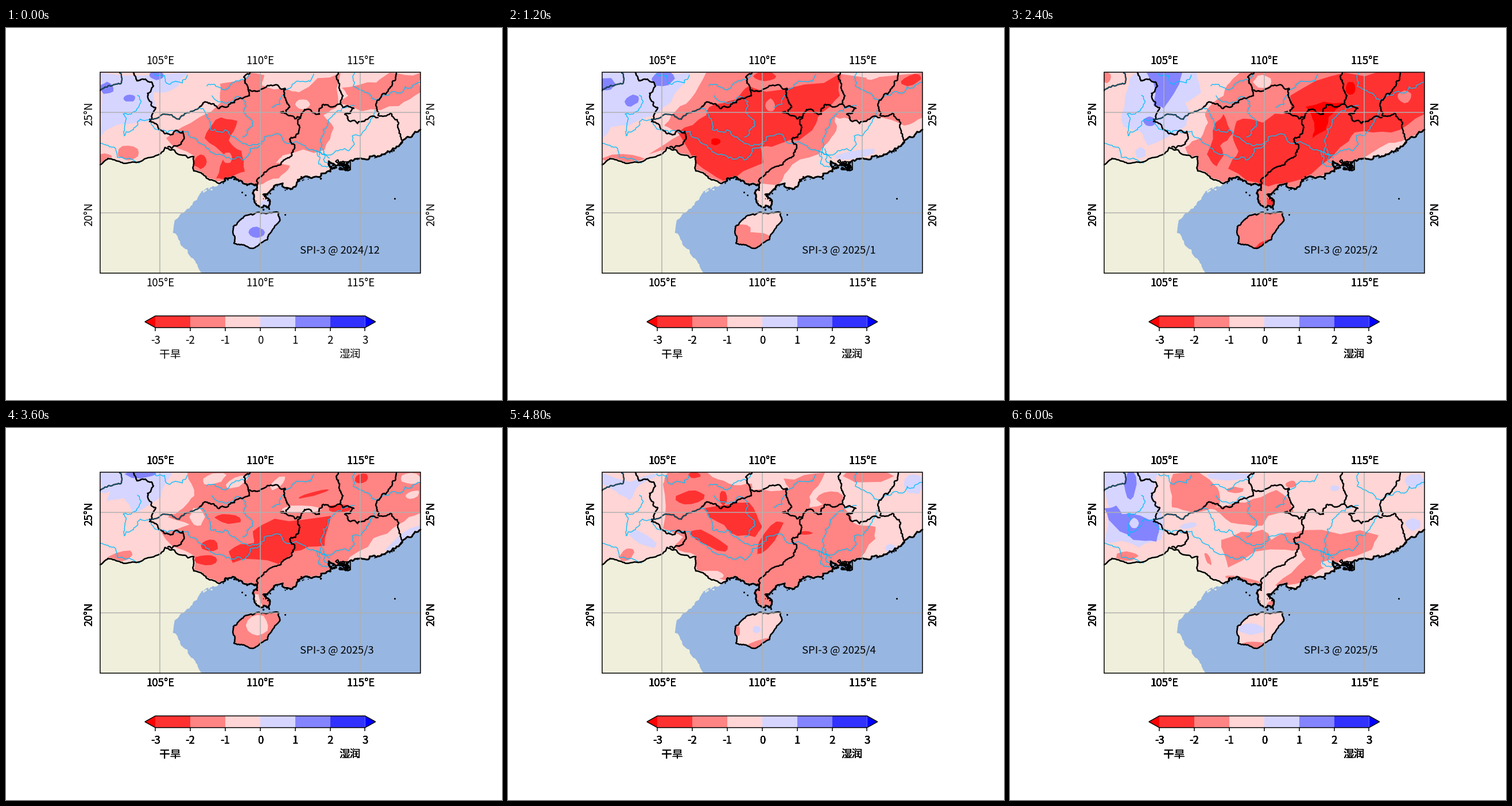
Recreate the animation shown at these times as a matplotlib script. Size 864 px wide and 648 px high, loop 7.2 s.

```python
import numpy as np
import matplotlib.pyplot as plt
from matplotlib.animation import FuncAnimation
from matplotlib.patches import Polygon
from matplotlib.path import Path

W, H, DPI = 864, 648, 135
COUNT, STEP = 6, 1200
COLORS = ["#ff0000", "#ff3232", "#ff8484", "#ffd5d5",
          "#d5d5ff", "#8484ff", "#3232ff", "#0000ff"]
OCEAN, LAND, RIVER, GRID = "#97b6e1", "#efefdb", "#00bfff", "#b0b0b0"
LEFT, RIGHT, TOP, BOTTOM = 163.5, 722.1, 77.3, 427.0
DEG = (RIGHT - LEFT) / 16

plt.rcParams["font.family"] = "Noto Sans CJK JP"
plt.rcParams["font.size"] = 10
rng = np.random.default_rng(7)

fig = plt.figure(figsize=(W / DPI, H / DPI), dpi=DPI, facecolor="white")
ax = fig.add_axes([0, 0, 1, 1])
ax.set_xlim(0, W)
ax.set_ylim(H, 0)
ax.axis("off")
fields = [[] for _ in range(COUNT)]
labels = [[] for _ in range(COUNT)]


def pts(*v):
    return np.reshape(np.array(v, float), (-1, 2))


def rough(p, amp=0.14, rounds=4):
    """Fractal line: halve every segment and push its middle sideways."""
    for _ in range(rounds):
        d = np.diff(p, axis=0)
        side = d[:, ::-1] * [1, -1] * rng.normal(0, amp, (len(d), 1))
        out = np.empty((2 * len(p) - 1, 2))
        out[::2] = p
        out[1::2] = (p[:-1] + p[1:]) / 2 + side
        p = out
    return p


def line(p, color, lw, z):
    ax.plot(p[:, 0], p[:, 1], color=color, lw=lw, zorder=z,
            solid_joinstyle="round", solid_capstyle="round")


def fill(p, color, z):
    return ax.add_patch(Polygon(p, closed=True, fc=color, ec="none", zorder=z))


def outline(p):
    ax.add_patch(Polygon(p, fill=False, ec="black", lw=0.8, joinstyle="miter", zorder=6))


def box(x0, y0, x1, y1):
    return pts(x0, y0, x1, y0, x1, y1, x0, y1)


def dot(x, y, size, color="black", z=4):
    ax.plot(x, y, "o", color=color, ms=size, mew=0, zorder=z)


def border(*v):
    line(rough(pts(*v)), "black", 1.35, 4)


def river(*v):
    line(rough(pts(*v)), RIVER, 0.7, 3)


def border_river(*v):
    p = rough(pts(*v), 0.1)
    line(p, "black", 1.2, 4)
    line(p, "#1f86ad", 0.5, 4)


# ---- land and sea
frontier = rough(pts(164, 238, 178, 227, 200, 234, 233, 233, 277, 208, 291, 212,
                     327, 224, 327, 249, 350, 262, 378, 268), 0.1)
coast = rough(pts(378, 268, 391, 261, 411, 267, 437, 274, 432, 290, 441, 311, 456, 313,
                  460, 302, 448, 290, 462, 282, 467, 275, 515, 262, 530, 261, 567, 244,
                  562, 232, 575, 240, 606, 230, 641, 222, 660, 220, 684, 206,
                  690, 198, 722, 177), 0.18)
gulf = rough(pts(378, 268, 338, 288, 325, 308, 300, 330, 291, 357, 316, 386, 343, 427), 0.1)
island = rough(pts(396, 346, 415, 328, 440, 321, 475, 322, 477, 336, 464, 352,
                   455, 369, 430, 384, 397, 375, 396, 346), 0.1)
north = np.vstack([pts(LEFT, TOP, RIGHT, TOP), coast[::-1]])

fill(box(LEFT, TOP, RIGHT, BOTTOM), OCEAN, 0)
fill(np.vstack([north, gulf, pts(LEFT, BOTTOM)]), LAND, 1)
fill(island, LAND, 1)
line(frontier, "black", 1.35, 4)
line(coast, "black", 1.6, 4)
line(island, "black", 1.35, 4)

# islets along the shore, the harbour cluster and the delta shoals
for x, y in coast[rng.integers(0, len(coast) - 30, 60)]:
    dot(x + rng.normal(0, 2), y + rng.uniform(-1, 4), rng.uniform(0.8, 2))
for _ in range(14):
    ring = pts(-4, 0, 0, -3, 4, 0, 0, 3, -4, 0) * rng.uniform(0.4, 1.2)
    line(rough(ring, 0.3, 2) + rng.uniform([570, 233], [596, 246]), "black", 1.1, 4)
line(box(582, 233, 600, 247), "black", 0.9, 4)
for x, y in ((411, 286), (417, 291), (486, 325), (677, 297)):
    dot(x, y, 1.6)
for x in rng.uniform(328, 362, 14):
    dot(x, 293 - (x - 328) / 2 + rng.normal(0, 3), 1.4, LAND, 1)

# ---- provincial borders
border(222, 78, 228, 92, 243, 89, 257, 101, 247, 120, 261, 139, 250, 163,
       274, 180, 308, 180, 304, 203, 282, 207)
border(337, 138, 348, 129, 372, 140, 398, 130, 424, 118, 419, 98, 425, 78)
border(424, 108, 443, 107, 486, 105, 485, 120, 494, 138, 478, 147, 513, 155)
border(513, 155, 510, 180, 495, 198, 491, 226, 463, 243, 437, 265, 437, 274)
border(513, 155, 520, 142, 546, 150, 553, 133, 582, 132, 606, 140, 590, 150, 600, 163, 648, 156)
border(579, 78, 580, 104, 587, 118, 582, 132)
border(690, 196, 684, 165, 648, 152, 652, 122, 673, 98, 680, 78)
border_river(164, 109, 183, 101, 200, 97, 198, 78)
border_river(250, 159, 274, 150, 302, 159, 312, 149, 337, 138)

# ---- rivers
river(164, 201, 191, 210, 233, 235)
river(229, 117, 229, 140, 204, 150, 206, 188, 226, 172, 250, 160)
river(259, 80, 284, 98, 307, 96, 316, 82)
river(350, 101, 374, 104, 400, 92, 425, 80)
river(359, 118, 412, 124, 414, 148, 430, 168, 412, 190)
river(337, 139, 357, 178, 401, 192, 440, 202, 516, 203, 541, 214, 563, 227)
river(252, 163, 317, 180, 340, 202, 376, 221, 412, 230, 446, 201)
river(463, 138, 484, 110, 530, 93, 536, 80)
river(607, 78, 619, 108, 646, 126, 690, 112, 722, 95)
river(607, 135, 570, 151, 548, 194, 546, 222)
river(643, 143, 627, 176, 597, 214, 541, 214)
river(541, 214, 566, 245)
river(552, 210, 562, 238)

# ---- index field, clipped to the covered area
cover = np.vstack([north, frontier[::-1], north[:1]]) - [0, 2]
cover = np.maximum(cover, [LEFT, TOP])
clip = Path.make_compound_path(Path(cover), Path(island))


def paint(i, level, p):
    patch = fill(p, COLORS[level], 2)
    patch.set_clip_path(clip, ax.transData)
    fields[i].append(patch)


def area(i, level, *v):
    p = pts(*v)
    paint(i, level, rough(np.vstack([p, p[:1]]), 0.06, 2))


def blob(i, level, x, y, rx, ry, tilt=0):
    t = np.linspace(0, 2 * np.pi, 12, endpoint=False)
    r = rng.uniform(0.9, 1.15, 12)
    u, v = rx * r * np.cos(t), ry * r * np.sin(t)
    c, s = np.cos(np.radians(tilt)), np.sin(np.radians(tilt))
    paint(i, level, np.column_stack([x + u * c - v * s, y + u * s + v * c]))


for i, level in enumerate((4, 3, 2, 2, 3, 3)):
    paint(i, 3, box(LEFT, TOP, RIGHT, BOTTOM))
    paint(i, level, box(390, 317, 484, 390))

# December
area(0, 4, 164, 78, 316, 78, 300, 101, 257, 112, 261, 142, 250, 160, 208, 168, 180, 175, 164, 190)
blob(0, 5, 176, 105, 11, 10)
blob(0, 5, 262, 83, 13, 7)
blob(0, 5, 215, 122, 11, 6)
area(0, 2, 279, 192, 336, 156, 374, 130, 373, 97, 413, 90, 426, 78, 450, 82, 446, 100, 488, 106,
     510, 112, 583, 78, 579, 133, 553, 152, 571, 174, 555, 212, 482, 222, 470, 235, 495, 240,
     475, 262, 437, 274, 330, 270, 327, 222)
blob(0, 3, 517, 133, 12, 8)
area(0, 1, 365, 160, 403, 162, 388, 196, 410, 214, 416, 250, 385, 266, 366, 262, 382, 222, 346, 192)
blob(0, 1, 339, 233, 11, 12)
blob(0, 2, 386, 226, 8, 9)
area(0, 2, 668, 78, 722, 78, 722, 112, 684, 136, 620, 145, 580, 132, 596, 118, 585, 104, 645, 95)
blob(0, 2, 172, 227, 13, 9)
blob(0, 2, 213, 217, 18, 12)
blob(0, 4, 454, 306, 10, 8)
blob(0, 5, 437, 356, 13, 9)

# January
area(1, 4, 164, 78, 318, 78, 300, 104, 285, 128, 258, 150, 240, 156, 212, 170, 180, 172, 164, 194)
blob(1, 5, 172, 98, 14, 11)
blob(1, 5, 270, 88, 19, 13)
blob(1, 5, 216, 126, 13, 9, -30)
area(1, 2, 345, 78, 318, 124, 284, 152, 272, 170, 300, 186, 245, 220, 290, 214, 330, 270, 470, 274,
     495, 238, 550, 206, 568, 185, 570, 155, 600, 162, 645, 154, 690, 170, 722, 156, 722, 78)
blob(1, 2, 200, 228, 35, 8)
area(1, 1, 296, 182, 345, 152, 350, 138, 398, 124, 420, 101, 450, 111, 580, 78, 578, 118, 540, 155,
     530, 178, 478, 200, 440, 208, 445, 235, 375, 266, 328, 235)
blob(1, 1, 447, 84, 20, 8)
blob(1, 1, 702, 91, 18, 8, -20)
blob(1, 2, 457, 135, 8, 11)
blob(1, 0, 362, 198, 8, 6)
blob(1, 3, 637, 84, 12, 5, -20)
blob(1, 4, 605, 220, 35, 7, -10)
blob(1, 2, 425, 370, 40, 14)
blob(1, 2, 408, 355, 16, 14)

# February
area(2, 4, 200, 125, 208, 88, 225, 78, 325, 78, 333, 112, 305, 130, 312, 148, 300, 175,
     240, 205, 226, 180, 198, 172)
blob(2, 4, 227, 218, 9, 9)
area(2, 5, 238, 78, 300, 78, 285, 115, 268, 140, 250, 135, 250, 95)
blob(2, 5, 243, 163, 10, 8)
blob(2, 2, 169, 86, 7, 9)
area(2, 2, 378, 100, 400, 78, 722, 78, 722, 182, 660, 200, 600, 238, 462, 314, 440, 314, 330, 266,
     305, 208, 332, 192, 345, 165, 340, 148, 372, 118)
blob(2, 3, 440, 94, 15, 11)
area(2, 1, 395, 162, 440, 165, 488, 148, 488, 118, 583, 78, 722, 78, 722, 150, 664, 182, 600, 182,
     575, 208, 505, 264, 450, 276, 380, 245, 398, 215, 388, 190)
area(2, 1, 343, 220, 358, 165, 372, 150, 388, 184, 366, 205, 372, 222, 360, 241)
blob(2, 2, 687, 120, 12, 10)
area(2, 0, 515, 137, 580, 130, 555, 155, 550, 178, 527, 192, 530, 165)
blob(2, 0, 593, 105, 8, 11)
blob(2, 3, 668, 209, 18, 8, -30)
blob(2, 1, 454, 304, 7, 7)
blob(2, 1, 444, 376, 16, 5, -20)

# March
area(3, 4, 164, 78, 290, 78, 270, 120, 240, 140, 222, 148, 205, 122, 175, 128, 182, 110, 164, 112)
blob(3, 5, 234, 80, 26, 7)
area(3, 2, 316, 78, 328, 118, 308, 140, 282, 155, 320, 168, 270, 180, 290, 206, 327, 222, 330, 270,
     440, 290, 446, 314, 462, 314, 590, 240, 640, 192, 684, 168, 722, 148, 722, 78)
blob(3, 3, 333, 155, 12, 16)
blob(3, 3, 362, 88, 20, 9, -15)
blob(3, 3, 402, 94, 22, 8, -25)
blob(3, 3, 473, 96, 16, 7, -40)
blob(3, 3, 515, 141, 35, 6)
blob(3, 3, 706, 88, 17, 9)
blob(3, 3, 708, 116, 13, 6, -20)
area(3, 1, 430, 180, 468, 158, 566, 153, 555, 205, 500, 215, 475, 237, 395, 235, 388, 215, 432, 200)
blob(3, 1, 355, 205, 14, 10)
blob(3, 1, 348, 230, 18, 9)
blob(3, 1, 388, 158, 23, 8, 5)
blob(3, 1, 581, 140, 20, 7)
blob(3, 1, 619, 88, 12, 8, -20)
blob(3, 1, 535, 115, 26, 3, -15)
blob(3, 2, 195, 226, 28, 9, -20)
blob(3, 4, 692, 193, 36, 8, -38)
blob(3, 3, 438, 344, 20, 18)

# April
area(4, 4, 164, 78, 262, 78, 228, 100, 212, 126, 188, 110, 164, 98)
blob(4, 4, 234, 193, 27, 9, 28)
blob(4, 4, 706, 98, 17, 17)
blob(4, 4, 667, 210, 9, 7)
area(4, 2, 278, 78, 348, 78, 385, 97, 425, 97, 425, 108, 490, 105, 480, 88, 552, 78, 525, 120,
     525, 138, 580, 130, 600, 164, 640, 172, 640, 193, 600, 238, 462, 314, 440, 314, 420, 270,
     330, 255, 327, 222, 290, 206, 305, 190, 270, 175, 270, 98)
blob(4, 3, 463, 97, 18, 6)
blob(4, 3, 353, 256, 24, 8)
blob(4, 2, 628, 84, 42, 11)
blob(4, 2, 562, 124, 23, 13)
area(4, 1, 340, 140, 420, 130, 443, 172, 430, 190, 400, 188, 350, 155)
blob(4, 1, 455, 190, 36, 11, -55)
blob(4, 1, 350, 195, 37, 10, 27)
blob(4, 1, 317, 121, 24, 12, -10)
blob(4, 1, 325, 82, 10, 5)
blob(4, 1, 375, 122, 6, 13)
blob(4, 1, 517, 183, 13, 3)
blob(4, 2, 207, 221, 14, 9, -40)
blob(4, 4, 433, 351, 7, 6)
blob(4, 2, 437, 376, 25, 6, -18)
blob(4, 2, 400, 354, 4, 9)

# May
area(5, 4, 164, 78, 257, 78, 250, 110, 261, 140, 268, 170, 262, 195, 225, 208, 164, 200)
blob(5, 5, 210, 98, 10, 24)
area(5, 5, 164, 140, 185, 135, 195, 150, 258, 163, 255, 198, 215, 195, 172, 160)
blob(5, 4, 216, 166, 8, 9)
area(5, 2, 278, 100, 284, 80, 330, 78, 362, 105, 365, 135, 320, 148, 282, 138)
area(5, 2, 345, 140, 410, 130, 464, 108, 494, 146, 450, 153, 440, 170, 385, 165)
area(5, 2, 368, 195, 440, 177, 455, 195, 510, 178, 642, 187, 630, 212, 575, 232, 510, 268,
     462, 274, 515, 228, 505, 212, 480, 212, 380, 243)
blob(5, 3, 556, 238, 14, 8)
blob(5, 2, 392, 108, 15, 5)
blob(5, 2, 490, 98, 9, 6)
blob(5, 2, 203, 223, 19, 8)
blob(5, 2, 345, 228, 4, 11, -25)
blob(5, 2, 405, 264, 30, 4, 10)
blob(5, 2, 456, 306, 7, 5)
blob(5, 4, 380, 84, 38, 7)
blob(5, 4, 311, 170, 15, 5, -10)
blob(5, 4, 705, 92, 16, 12)
blob(5, 4, 702, 168, 13, 10)
blob(5, 4, 566, 105, 8, 5)
blob(5, 4, 420, 350, 22, 10)
blob(5, 2, 424, 377, 22, 5)

# ---- graticule, frame and colour bar
lons = {f"{d}°E": LEFT + (d - 102) * DEG for d in (105, 110, 115)}
lats = {f"{d}°N": TOP + (27 - d) * DEG for d in (25, 20)}
for x in lons.values():
    line(pts(x, TOP, x, BOTTOM), GRID, 0.8, 5)
for y in lats.values():
    line(pts(LEFT, y, RIGHT, y), GRID, 0.8, 5)
outline(box(LEFT, TOP, RIGHT, BOTTOM))

ticks = np.linspace(260.2, 625.4, 7)
a, b, tip = ticks[0], ticks[-1], 18.3
y0, y1 = 501.5, 521.9
ym = (y0 + y1) / 2
fill(pts(a - tip, ym, a, y0, a, y1), COLORS[0], 5)
fill(pts(b + tip, ym, b, y0, b, y1), COLORS[-1], 5)
for x0, x1, color in zip(ticks, ticks[1:], COLORS[1:]):
    fill(box(x0, y0, x1, y1), color, 5)
outline(pts(a - tip, ym, a, y0, b, y0, b + tip, ym, b, y1, a, y1))
for x in ticks:
    ax.plot([x, x], [y1, y1 + 6.5], color="black", lw=0.8, zorder=6, solid_capstyle="butt")


def label(x, y, s, ha="center", **kw):
    return ax.text(x, y, s, ha=ha, va="baseline", rotation_mode="anchor",
                   color="black", zorder=7, **kw)


# the fixed labels are overprinted once more at every step, so they grow bolder
for group in labels:
    for s, x in lons.items():
        group += [label(x + 0.5, y, s) for y in (63.4, 450.4)]
    for s, y in lats.items():
        group += [label(x, y + 2.5, s, rotation=90) for x in (150, 746)]
    group += [label(x, 549.6, str(k - 3)) for k, x in enumerate(ticks)]
    group += [label(286, 575.3, "干旱"), label(599.5, 575.3, "湿润")]
title = label(512, 392.6, "", ha="left", fontsize=9.85)


def update(i):
    for k in range(COUNT):
        for art in fields[k]:
            art.set_visible(k == i)
        for art in labels[k]:
            art.set_visible(k <= i)
    month = 11 + i
    title.set_text(f"SPI-3 @ {2024 + month // 12}/{month % 12 + 1}")
    return []


anim = FuncAnimation(fig, update, frames=COUNT, interval=STEP, repeat=True)
plt.show()
```
